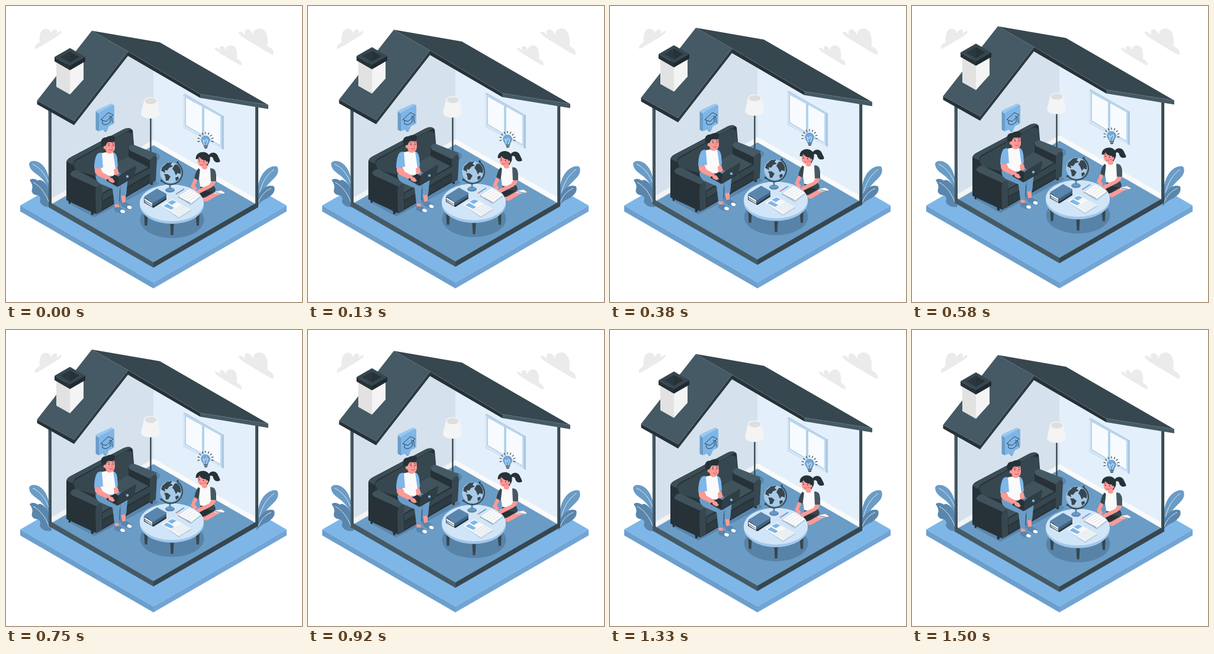
An HTML page with a canvas that plays this animation: 500x500 px, repeating every 1540 ms.

```html
<!DOCTYPE html>
<html lang="en">
<head>
<meta charset="utf-8">
<title>Learning at home</title>
<style>
  html, body { margin: 0; width: 100%; height: 100%; overflow: hidden; background: #fff; }
  canvas { display: block; width: 100vw; height: 100vh; }
</style>
</head>
<body>
<canvas id="stage"></canvas>
<script>
const SIZE = 500, LOOP = 1540, STEP = 1000 / 24, STEPS = 37;
const canvas = document.getElementById('stage');
const ctx = canvas.getContext('2d');
const scale = Math.max(1, window.devicePixelRatio || 1);
canvas.width = canvas.height = SIZE * scale;

const INK = '#263238', SLATE = '#37474f', STEEL = '#455a64';
const BLUE = '#7eb6e8', MID = '#6a9cc6', DEEP = '#5a86ad';
const SKIN = '#fb9a97', WHITE = '#fafafa';

const cache = new Map();
function shape(d) {
  if (!cache.has(d)) cache.set(d, new Path2D(d));
  return cache.get(d);
}
function fill(color, d) {
  ctx.fillStyle = color;
  ctx.fill(shape(d));
}
function line(color, width, d) {
  ctx.strokeStyle = color;
  ctx.lineWidth = width;
  ctx.stroke(shape(d));
}
function oval(color, x, y, rx, ry = rx, turn = 0) {
  ctx.fillStyle = color;
  ctx.beginPath();
  ctx.ellipse(x, y, rx, ry, turn, 0, Math.PI * 2);
  ctx.fill();
}
function shifted(dx, dy, sx, sy, draw) {
  ctx.save();
  ctx.translate(dx, dy);
  ctx.scale(sx, sy);
  draw();
  ctx.restore();
}

function cloud() {
  fill('#ebebeb', 'M49 72C48 66 52 64 57 61C56 52 57 44 62 40C67 37 73 39 75 43L76 47C77 41 82 38 85 40C87 42 86 45 86 47C90 42 94 41 94 44C93 47 88 50 82 54L57 69C53 71 50 73 49 72Z');
}

function clouds() {
  cloud();
  shifted(447, 28, -1, 1, cloud);
  shifted(516.2, -12.4, -1.31, 1.31, cloud);
}

function platform() {
  fill(BLUE, 'M24 337L249 207L474 337L249 467Z');
  fill('#6c9fcc', 'M24 337L249 467V477L24 347Z');
  fill('#72a5d5', 'M474 337L249 467V477L474 347Z');
}

function plants() {
  fill(MID, 'M39 267C40 260 52 260 60 267C70 276 75 292 76 318L71 312C69 300 62 292 54 286C46 280 40 276 39 267Z');
  line('#e9f3fc', 0.9, 'M45 267C58 273 68 286 74 304');
  fill(DEEP, 'M40 294C45 290 51 293 54 295C58 291 68 298 72 310L77 339C68 341 60 338 57 330C59 325 58 322 54 320C46 319 42 315 44 309C46 304 43 299 40 294Z');
  line('#e9f3fc', 0.9, 'M46 298C58 304 68 318 73 333');
  fill(MID, 'M459 273C462 284 454 290 446 298C438 306 432 314 424 338L425 312C426 291 436 275 450 271C454 270 458 270 459 273Z');
  line('#e9f3fc', 0.9, 'M453 276C440 285 431 300 427 321');
  fill(DEEP, 'M453 305C456 314 449 320 441 325C434 328 429 331 423 339L425 321C431 309 443 300 453 305Z');
  line('#e9f3fc', 0.9, 'M448 308C438 312 430 321 426 332');
}

function room() {
  fill('#d5e2ed', 'M77 174L115 195L206 80L249 105V237L77 336Z');
  fill('#e3f0fb', 'M249 105L328 150L422 166V336L249 237Z');
  fill(MID, 'M249 235L424 336L249 437L75 336Z');
  fill('#f2f3f4', 'M77 325L249 226V235L77 334Z');
  fill(WHITE, 'M249 226L422 325V334L249 235Z');
  fill(STEEL, 'M72 335L77 333L249 433V442L72 340Z');
  fill(SLATE, 'M249 433L422 333L426 335V340L249 442Z');
}

function windowFrame() {
  fill('#b5d1e9', 'M299 150L302 148L368 186V243L299 205Z');
  fill('#d7e7f6', 'M299 150L364 187V241L299 204Z');
  fill('#a9c9e5', 'M364 187L368 185V243L364 240Z');
  fill('#b5d1e9', 'M302 152L363 187V237L302 202Z');
  fill('#f7fbff', 'M304 155L331 170V217L304 201Z');
  fill('#f7fbff', 'M335 172L362 187V235L335 219Z');
}

function lamp() {
  oval(DEEP, 247, 255, 13, 8);
  oval(SLATE, 244.5, 253, 8, 4);
  line(SLATE, 2.4, 'M244.4 186V253');
  fill('#f4f4f4', 'M233 160L228 182C229 188 236 190 244 190C252 190 259 188 260 182L256 160C255 152 234 152 233 160Z');
  oval('#dedede', 244.5, 160.5, 10, 5.2);
}

function sofa() {
  fill(DEEP, 'M104 332L149 357L258 300L246 290L150 330Z');
  fill(INK, 'M105 325H109V334H106ZM143 343H148V353H144ZM243 292H248V302H244Z');
  fill(INK, 'M102 264Q103 258 110 255L199 208Q209 204 214 210L217 245L162 305L110 305L102 326Z');
  fill(SLATE, 'M114 268Q114 263 121 260L200 215Q210 210 214 218L216 250L155 288L118 278Z');
  fill('#3c4d56', 'M102 263Q104 258 110 255L199 208Q208 204 212 208L118 259Q113 262 113 268Z');
  line(INK, 0.9, 'M166 237V275M215 238V250');
  fill('#40535c', 'M155 284L205 255Q210 253 214 255L244 272L164 318L152 303Z');
  line(INK, 0.8, 'M165 278L205 296');
  fill(INK, 'M161 317L244 270V299L161 347Z');
  fill(SLATE, 'M163 318L243 273V283L163 329Z');
  fill('#2d3b42', 'M163 331L243 286V297L163 344Z');
  fill(INK, 'M207 239L245 260L244 274L207 255Z');
  fill(STEEL, 'M207 239.5Q210 233.5 216 234.5L254 249.5Q255 255 245 261L209 244Z');
  fill(SLATE, 'M243 262Q245 256 250 253.5Q255 252 255 258L253 295L243 301Z');
  fill(INK, 'M102 287Q106 281 112 283L153 305V352L102 328Z');
  fill('#40535c', 'M108 284Q112 277 119 277L160 298Q162 301 154 307L112 288Z');
  fill(SLATE, 'M151 314Q152 305 158 302.5Q162 301 162 307V347L152 352Z');
}

function bubble() {
  fill(MID, 'M151.5 178L157 181V212L151.5 209Z');
  fill('#9bc8ef', 'M151.5 178Q153 176 155 175L178 164.5L183 168L157 182Z');
  fill(BLUE, 'M157 183Q157 180 159 179L180 167.5Q183 166 183 170V196Q183 199 180 200L174 203L170 212L165 208L159 211Q157 212 157 209Z');
  fill(MID, 'M165 208L170 212L168 213L163 208Z');
  ctx.lineJoin = 'round';
  line(INK, 0.9, 'M160 192L173 180L181 184L169 195ZM163 194V199Q169 203 176 196V189M174 186L179 188V193M179 193L180 197');
}

function man() {
  fill('#5788b4', 'M157 287L185 279L204 288Q206 292 204 301L201 329L192 330L193 308L178 306Z');
  fill(SKIN, 'M194 320L202 319L202 333L197 335Z');
  fill(MID, 'M151 286Q166 283 177 292L191 302Q194 305 192 312L191 335H183L180 309L159 300Q151 295 151 286Z');
  fill(MID, 'M194 303L206 289L203 320L194 321Z');
  fill(SKIN, 'M183 335H190L192 344L185 345Z');
  fill(DEEP, 'M183 340L192 340L200 345Q203 349 198 351Q189 350 183 346Z');
  oval(WHITE, 197, 347, 4, 2.8, 0.3);
  fill(DEEP, 'M194 333L203 331L212 337Q215 342 210 344Q202 343 195 338Z');
  oval(WHITE, 208.5, 340, 4, 2.8, 0.3);
  fill(SKIN, 'M169 242L179 241L180 251L170 254Z');
  fill(WHITE, 'M159 249L169 247Q176 252 180 247L184 249L187 281L181 287L162 287L158 272Z');
  fill(BLUE, 'M154 250Q160 246 162 249L164 273L149 275Q149 258 154 250Z');
  fill(BLUE, 'M181 247Q187 249 188 258L189 272L185 275Z');
  fill(SKIN, 'M150 274L160 274L163 281L181 291Q185 295 182 299Q175 297 171 294L154 286Q149 283 150 274Z');
  fill(SKIN, 'M182 276L188 273L191 283L183 287Z');
  shifted(0, 1.5, 1, 1, manHead);
  fill(INK, 'M169 294L184 285L204 296L189 305Z');
  fill(SKIN, 'M171 289L180 291L184 297L180 299L174 296Z');
  fill('#303e45', 'M188 304L190 291Q190 287 193 285L218 270Q220 269 220 272L217 286Q216 289 213 291L190 304Z');
  line(INK, 1, 'M170 295L188 305L214 290');
  oval(BLUE, 205, 288, 2.2);
}

function manHead() {
  fill(SKIN, 'M167 229L183 226L184 237Q184 246 177 246Q169 246 167 239Z');
  oval(SKIN, 167, 237, 2.4, 3.2);
  fill(INK, 'M161 233C159 225 163 220 169 220.5C175 216.5 184 217 184 221L183 228C176 230 173 226 170 231L168 235L165 235L164 238Z');
  oval(INK, 174, 234, 0.9);
  oval(INK, 181, 233.5, 0.9);
  line(INK, 0.8, 'M172 231.5L175 231M179 230.5L182 230');
  line('#c95f67', 0.8, 'M178 234L180 237L178 238');
  line('#b44f59', 0.9, 'M174 241Q178 243.5 181 240.5');
}

function girlLegs() {
  fill(SKIN, 'M332 325Q340 318 352 315L364 311L370 316L359 319L340 330Q334 332 332 325Z');
  fill(WHITE, 'M352 314L363 312L369 315Q369 318 364 318L352 317Z');
  line(DEEP, 1.2, 'M353 315L368 318');
  fill(SLATE, 'M329 302L349 302Q356 308 353 314L341 321Q332 327 326 322Z');
  fill(INK, 'M325 310L350 314L335 323Q326 326 322 319Z');
}

function girl() {
  fill(SLATE, 'M325 274Q319 282 318 293L324 296L331 279Z');
  fill(SKIN, 'M318 291L324 294L319 303L323 309L319 312L312 305Z');
  fill(WHITE, 'M328 274L336 271L346 274L350 302Q341 309 328 305L326 291Z');
  fill(SKIN, 'M331 266L339 266L340 274Q335 278 331 274Z');
  fill(STEEL, 'M345 274Q354 273 355 285L355 297L346 296Z');
  fill(SKIN, 'M347 296L355 296Q353 303 346 307L326 317L321 314L324 310L343 302Z');
  shifted(0.7, 0.8, 1, 1, girlHead);
}

function girlHead() {
  fill(INK, 'M340 254C343 246 353 244 357 252C359 257 361 259 361 262C356 265 350 263 349 256C347 253 344 253 341 258Z');
  fill(SKIN, 'M323 255L339 253L341 264Q338 272 331 271Q324 270 323 262Z');
  fill(INK, 'M320 258C319 250 326 245 334 246C342 247 346 255 343 263L339 270L337 260C332 260 328 257 326 254C325 257 323 258 320 258Z');
  oval(SKIN, 339, 264, 1.8, 2.5);
  oval(INK, 326, 261, 0.9);
  oval(INK, 333, 262, 0.9);
  line(INK, 0.7, 'M324 258L327 257.5M332 258.5L335 259.5');
  oval('#f2777b', 335, 266, 1.8, 1.2);
  line('#b44f59', 0.8, 'M327 266Q329 269 332 267');
}

function bulb() {
  oval(MID, 337, 226.5, 7.8);
  fill(MID, 'M331 231L343 231L341 237H334Z');
  oval('#73a8d9', 336.3, 226, 6.6);
  line('#fff', 0.8, 'M335 235L333 226L336 229L338 225L341 227L338 235');
  fill(STEEL, 'M334 236L341 236L340 240Q337 242 335 240Z');
  line('#fff', 0.6, 'M334 238L341 238');
  ctx.strokeStyle = INK;
  ctx.lineWidth = 1.1;
  for (let i = -4; i <= 4; i++) {
    const a = -Math.PI / 2 + i * 0.44, s = Math.sin(a), c = Math.cos(a);
    ctx.beginPath();
    ctx.moveTo(337 + c * 10, 226.5 + s * 10);
    ctx.lineTo(337 + c * 13.8, 226.5 + s * 13.8);
    ctx.stroke();
  }
}

function table() {
  oval('#5883a9', 280.5, 361, 54, 31);
  fill(SLATE, 'M233 348H240L238.5 371H234.5ZM277 360H284L282.5 387H278.5ZM320 348H327L326 371H322Z');
  oval('#a0c7eb', 280, 336, 54, 32);
  oval('#d1e5f8', 280, 332.5, 54, 31);
}

function globe() {
  oval(DEEP, 277, 311, 8, 4);
  oval(MID, 277, 309.5, 6.5, 3);
  line(DEEP, 3, 'M277 302V309');
  ctx.save();
  ctx.beginPath();
  ctx.arc(278, 281.5, 17.8, 0, Math.PI * 2);
  ctx.clip();
  oval('#a9cae7', 278, 281.5, 18);
  fill(SLATE, 'M264 272L272 265L281 264L278 268L282 271L276 273L272 278L268 277L269 282L262 278ZM267 284L273 284L278 288L274 295L270 295L269 288ZM285 268L291 268L296 276L295 284L290 282L287 286L284 279L281 275ZM286 290L291 288L292 292L287 296Z');
  ctx.restore();
  ctx.strokeStyle = SLATE;
  ctx.lineWidth = 2;
  ctx.beginPath();
  ctx.arc(278, 281.5, 20, -0.95, 2.45);
  ctx.stroke();
  oval(SLATE, 290, 264, 1.8);
  oval(SLATE, 262.5, 295, 1.8);
}

function book(dy, cover, side) {
  shifted(0, dy, 1, 1, () => {
    fill(side, 'M233 323L248 332L271 318V324L249 338L233 329Z');
    fill(WHITE, 'M234 325L247 333V336L234 328Z');
    fill(cover, 'M233 322L254 309Q256 308 258 310L271 317V319L248 333Z');
  });
}

function notebook() {
  fill('#acc2d4', 'M290 323L311 334L328 321V323L311 336Z');
  fill('#fbfbfb', 'M290 322L309 309L328 320L311 333Z');
  line('#c9d3db', 0.7, 'M296 322L311 312M300 324L315 314M304 326L319 317M308 329L323 319');
  ctx.setLineDash([1, 1.6]);
  line(SLATE, 1.6, 'M290 322L311 333');
  ctx.setLineDash([]);
}

function papers() {
  book(3, SLATE, INK);
  book(0, DEEP, '#41627f');
  fill('#b4cadd', 'M262 338L292 357L313 344V346L292 359Z');
  fill('#f5f7f8', 'M262 337L281 326Q287 329 291 332L313 344L292 357Q286 351 279 348Z');
  line('#c5d1da', 0.7, 'M279 347L300 336M284 348L303 338M287 350L306 340M290 352L309 342M292 355L311 344');
  fill(BLUE, 'M273 332L281 328L288 331L280 336ZM266 338L272 334L284 341L279 344Z');
  shifted(1, 0.3, 1, 1, notebook);
  line(MID, 1.8, 'M287 318L301 309');
  line('#ef8589', 1.8, 'M287 318L291 315.5');
  line(MID, 1.2, 'M328 299L322 312');
}

function posts() {
  fill(STEEL, 'M71.5 172H76.7V334L72 338Z');
  fill(SLATE, 'M75 174H76.7V334L75 336Z');
  fill(SLATE, 'M421 168H426.2V338L421 334Z');
  fill(STEEL, 'M421 168H423V335L421 334Z');
}

function roof() {
  fill(SLATE, 'M145 41.7L260 61.5L443 167L328 149L206 76.5Z');
  fill(STEEL, 'M145 41.7L206 76.5L115 194L52.5 159.7Z');
  fill(INK, 'M52.5 159.7L115 194V201.3L52.5 166Z');
  fill('#2d3a41', 'M115 194L206 76.5V84.3L115 201.3Z');
  fill(INK, 'M206 76.5L328 149V155.3L206 84.3Z');
  fill(STEEL, 'M328 149L443 167V174L328 155.3Z');
  line('#64757d', 0.6, 'M53 160L115 194L206 76.5L328 149L443 167');
}

function chimney() {
  fill('#e2e2e2', 'M85 92L108 105V149.5L85 136.5Z');
  fill('#f4f4f4', 'M108 105L131 92V124L108 149.5Z');
  fill(SLATE, 'M82 86L108 71L134 86L108 101Z');
  fill(INK, 'M82 86L108 101V108.5L82 93.5Z');
  fill('#1f2a30', 'M134 86L108 101V108.5L134 93.5Z');
  fill('#2b373e', 'M92 86L108 77V95.5Z');
  fill(INK, 'M108 77L124 86L108 95.5Z');
}

// Linear rise and fall of ten pixels, lowest shortly before the loop restarts.
function floatOffset(ms) {
  const step = Math.floor((ms + 4) / STEP) % STEPS;
  const phase = ((step * STEP + 60) / (STEP * STEPS)) % 1;
  return 0.8 - 10 * (1 - Math.abs(2 * phase - 1));
}

function render(ms) {
  const dy = floatOffset(ms);
  const floating = (...parts) => shifted(0, dy, 1, 1, () => parts.forEach(part => part()));
  ctx.setTransform(scale, 0, 0, scale, 0, 0);
  ctx.fillStyle = '#fff';
  ctx.fillRect(0, 0, SIZE, SIZE);
  clouds();
  platform();
  plants();
  floating(room, windowFrame, lamp, sofa);
  bubble();
  floating(man, girlLegs, table, globe, papers, girl, bulb, posts, roof, chimney);
}

const start = performance.now();
function tick() {
  render((performance.now() - start) % LOOP);
  requestAnimationFrame(tick);
}
tick();
</script>
</body>
</html>
```
